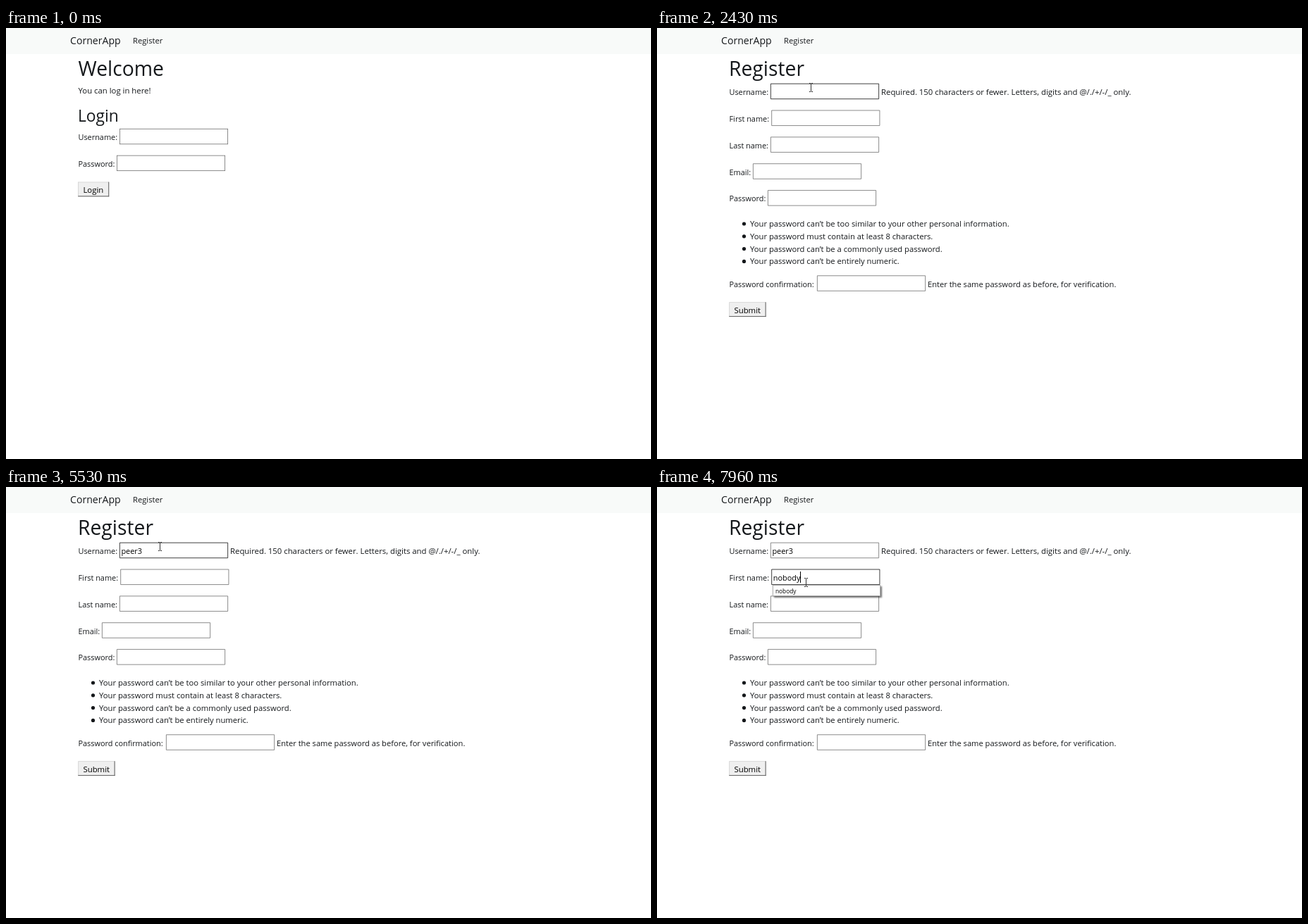
Recreate the animation shown at these times as an HTML page with a canvas. Size 915x612 px, loop 8 s.

```html
<!DOCTYPE html>
<html lang="en">
<head>
<meta charset="utf-8">
<title>Registration form</title>
<style>
  html, body { margin: 0; width: 100%; height: 100%; overflow: hidden; background: #fff; }
  canvas { display: block; }
</style>
</head>
<body>
<canvas id="stage" width="915" height="612"></canvas>
<script>
const ctx = document.getElementById('stage').getContext('2d');
const LOOP = 8000;
const PAGE_CHANGE = 1950;
const FONT = '"Open Sans", "Noto Sans", sans-serif';
const INK = '#15181b';
const H1 = 28.3, H2 = 22.8, BODY = 11.2, LABEL = 10.9, SMALL = 8.3;
const ROW = 37.85;      // distance between form rows
const HAIRLINE = 0.75;  // border width

// Pointer steps: time, x, y, shape
const pointerSteps = [
  [210, 548, 573, 'arrow'], [460, 505, 515, 'arrow'], [540, 410, 405, 'arrow'],
  [620, 300, 295, 'arrow'], [700, 210, 205, 'arrow'], [780, 154, 138, 'beam'],
  [860, 143, 98, 'beam'], [930, 161, 74, 'beam'], [1010, 190, 57, 'beam'],
  [1090, 209, 45, 'beam'], [1170, 208, 32, 'arrow'], [1250, 200, 4, 'hand'],
  [1410, 198, 15, 'hand'], [1490, 199, 6, 'hand'], [1720, 198, 11, 'hand'],
  [1790, 198, 15, 'hand'], [2030, 206, 27, 'arrow'], [2110, 210, 42, 'arrow'],
  [2190, 214, 58, 'beam'], [2270, 217, 72, 'beam'], [2350, 218, 80, 'beam'],
  [2430, 218, 84, 'beam'], [6080, 207, 94, 'beam'], [6160, 191, 103, 'arrow'],
  [6240, 182, 107, 'arrow'], [6320, 188, 115, 'arrow'], [6400, 202, 128, 'beam'],
  [6480, 211, 135, 'beam']
];

const keys = {
  username: { word: 'peer3', times: [3740, 3980, 4140, 4210, 5220] },
  firstName: { word: 'nobody', times: [7340, 7500, 7580, 7650, 7890, 7960] }
};

const caretSpans = {
  username: [[2900, 3430], [3740, 4520], [5070, 5530], [6000, 6560]],
  firstName: [[6560, 6950], [7340, LOOP]]
};

const loginFields = [
  { label: 'Username:', x: 161 },
  { label: 'Password:', x: 157 }
];

const registerFields = [
  { id: 'username', label: 'Username:', x: 161 },
  { id: 'firstName', label: 'First name:', x: 162.3 },
  { label: 'Last name:', x: 161 },
  { label: 'Email:', x: 136 },
  { label: 'Password:', x: 157 }
];
const confirmField = { label: 'Password confirmation:', x: 227 };

const rules = [
  'Your password can\u2019t be too similar to your other personal information.',
  'Your password must contain at least 8 characters.',
  'Your password can\u2019t be a commonly used password.',
  'Your password can\u2019t be entirely numeric.'
];

const during = (t, from, to) => t >= from && t < to;

function text(str, x, y, size = BODY, color = INK) {
  ctx.font = `${size}px ${FONT}`;
  ctx.fillStyle = color;
  ctx.fillText(str, x, y);
}

function box(x, y, w, h, fill, border) {
  ctx.fillStyle = fill;
  ctx.fillRect(x, y, w, h);
  ctx.strokeStyle = border;
  ctx.lineWidth = HAIRLINE;
  ctx.strokeRect(x + HAIRLINE / 2, y + HAIRLINE / 2, w - HAIRLINE, h - HAIRLINE);
}

function polygon(points, x, y) {
  ctx.beginPath();
  points.forEach(([px, py]) => ctx.lineTo(x + px, y + py));
  ctx.closePath();
  ctx.fillStyle = '#fff';
  ctx.strokeStyle = '#222';
  ctx.lineWidth = 1;
  ctx.lineJoin = 'round';
  ctx.fill();
  ctx.stroke();
}

const drawPointer = {
  arrow(x, y) {
    polygon([[.5, .5], [.5, 12], [3, 9.7], [4.8, 14], [6.6, 13.2], [4.8, 9.2], [8.3, 9]], x, y);
  },
  hand(x, y) {
    polygon([[3.7, 10.5], [3.7, 2], [5, .8], [6.4, 2], [6.4, 6.4], [9, 6.5], [11.4, 7.3],
      [12.8, 8.6], [12.8, 12.5], [11.4, 15.3], [11, 17.5], [5.2, 17.5], [4.6, 15],
      [1, 10.4], [1.2, 9], [2.4, 9]], x, y);
  },
  beam(x, y) {
    ctx.fillStyle = '#333';
    ctx.fillRect(x, y - 5, 1, 11);
    for (const edge of [-6, 6]) {
      ctx.fillRect(x - 2, y + edge, 2, 1);
      ctx.fillRect(x + 1, y + edge, 2, 1);
    }
  }
};

function drawButton(label, y, w) {
  const x = 102.2, h = 20.8;
  box(x, y, w, h, '#efefef', '#d0d0d0');
  ctx.fillStyle = '#666';
  ctx.fillRect(x + w - 1, y, 1, h);
  ctx.fillRect(x, y + h - 1, w, 1);
  text(label, x + 7.2, Math.round(y + 15.6), 11.4, '#000');
}

function drawField({ id, label, x }, y, t, pointer) {
  const base = Math.round(y + 16.2);
  const hovered = pointer && pointer[3] === 'beam' &&
    during(pointer[1], x, x + 154) && during(pointer[2], y, y + 22);
  text(label, 102.5, base, LABEL);
  box(x, y, 154, 22.3, '#fff', hovered ? '#000' : '#666');
  if (!id) return;
  const { word, times } = keys[id];
  const typed = word.slice(0, times.filter(time => time <= t).length);
  text(typed, x + 2.4, base, LABEL, '#000');
  if (caretSpans[id].some(([from, to]) => during(t, from, to))) {
    const caretX = Math.floor(x + 2.4 + ctx.measureText(typed).width);
    ctx.fillStyle = '#000';
    ctx.fillRect(caretX, base - 13, 1, 16);
  }
}

function drawSuggestions(items, x, y) {
  const height = 1 + items.length * 15;
  ctx.save();
  ctx.shadowColor = 'rgba(0, 0, 0, .55)';
  ctx.shadowBlur = 2;
  ctx.shadowOffsetX = ctx.shadowOffsetY = 2;
  ctx.fillRect(x, y, 153, height);
  ctx.restore();
  box(x, y, 153, height, '#fff', '#888');
  items.forEach((item, i) => text(item, x + 4, y + 12 + i * 15, SMALL, '#000'));
}

function drawLogin(t, pointer) {
  const top = 142.9;
  text('Welcome', 102.5, 67.5, H1);
  text('You can log in here!', 102.5, 93, 11.35);
  text('Login', 102, 132.6, H2);
  loginFields.forEach((field, i) => drawField(field, top + i * ROW, t, pointer));
  drawButton('Login', top + 2 * ROW, 44);
}

function drawRegister(t, pointer) {
  const top = 78.8, confirmTop = 351.4;
  text('Register', 102, 67.5, H1);
  registerFields.forEach((field, i) => drawField(field, top + i * ROW, t, pointer));
  drawField(confirmField, confirmTop, t, pointer);
  text('Required. 150 characters or fewer. Letters, digits and @/./+/-/_ only.', 318, 95, 11.35);
  text('Enter the same password as before, for verification.', 384, 368, 11.15);
  rules.forEach((rule, i) => {
    const y = 278 + i * 17.8;
    ctx.beginPath();
    ctx.arc(123.5, y, 2.6, 0, Math.PI * 2);
    ctx.fillStyle = INK;
    ctx.fill();
    text(rule, 132, Math.round(y + 4), 11.23);
  });
  drawButton('Submit', confirmTop + ROW, 52.4);

  if (during(t, 2900, 5220)) {
    box(217, 99, 100, 16, '#fff', '#777');
    text('Please fill out this field.', 221, 110, SMALL, '#333');
  }
  if (during(t, 3820, 5220)) drawSuggestions(['peer2', 'newpeer'], 162, 101);
  if (t >= 7420) drawSuggestions(['nobody'], 164, 139);
}

function draw(t) {
  const pointer = pointerSteps.filter(step => step[0] <= t).pop();
  ctx.fillStyle = '#fff';
  ctx.fillRect(0, 0, 915, 612);
  ctx.fillStyle = '#f8faf9';
  ctx.fillRect(0, 0, 915, 37);
  text('CornerApp', 91, 23, 14.1);
  text('Register', 180, 22, BODY);
  (t < PAGE_CHANGE ? drawLogin : drawRegister)(t, pointer);
  if (pointer) drawPointer[pointer[3]](pointer[1], pointer[2]);
}

const start = performance.now();
function tick() {
  draw((performance.now() - start) % LOOP);
  requestAnimationFrame(tick);
}
tick();
</script>
</body>
</html>
```
